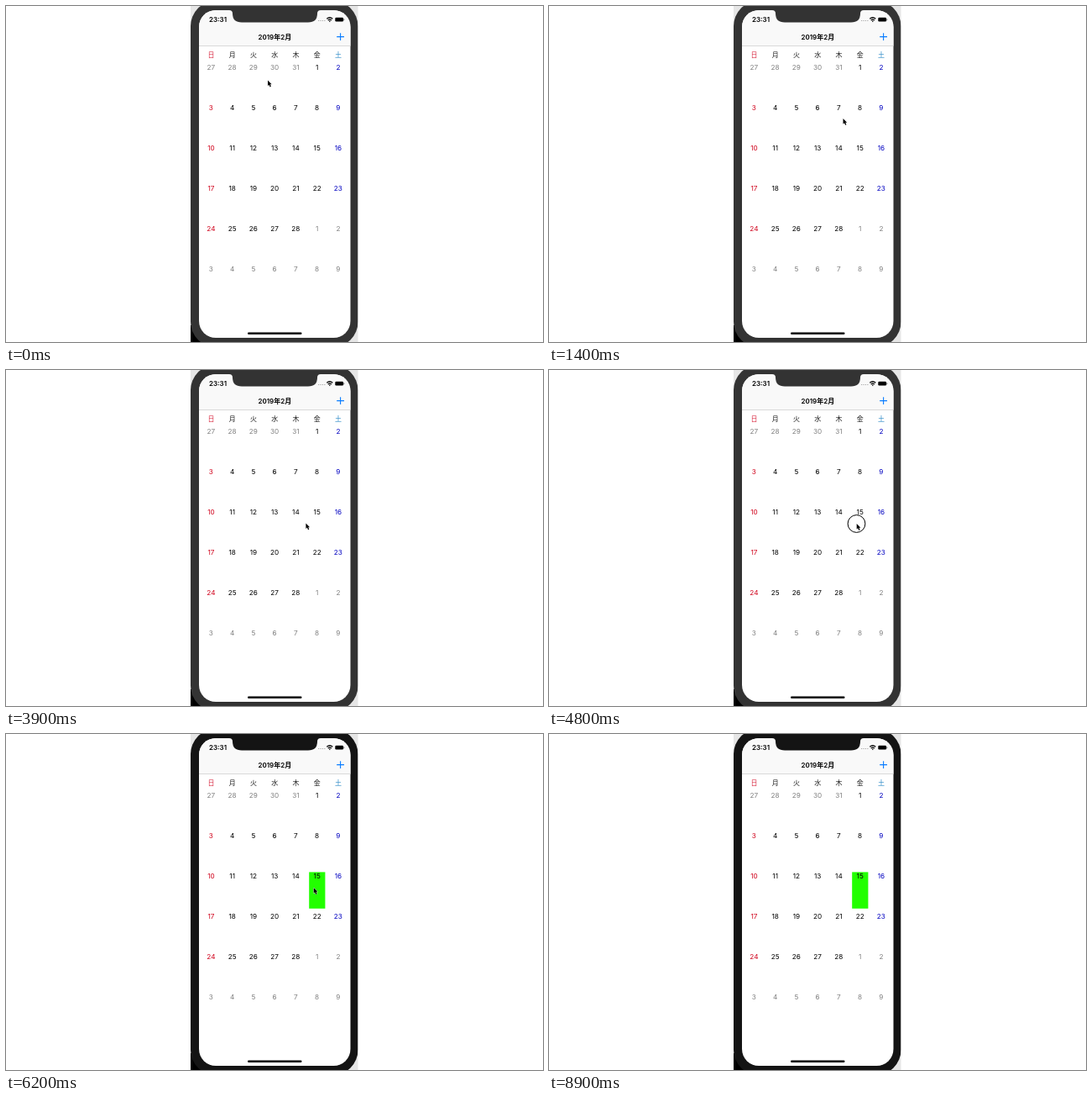
These frames come from a looping animation (640 by 400 pixels, 9000 ms). An HTML page:

```html
<!DOCTYPE html>
<html lang="ja">
<head>
<meta charset="utf-8">
<style>
  html, body { margin: 0; width: 100%; height: 100%; overflow: hidden; background: #fff; }
  svg { display: block; width: 640px; height: 400px; }
  text { font-family: Inter, "Noto Sans CJK JP", "Noto Sans CJK", sans-serif; font-size: 8.2px; text-anchor: middle; }
  .bold { font-weight: 600; font-size: 8px; }
  .weekday { font-size: 8px; }
</style>
</head>
<body>
<svg viewBox="0 0 640 400">
  <defs>
    <clipPath id="stage"><rect x="220" width="199.5" height="400"/></clipPath>
    <clipPath id="screen"><rect x="230" y="5" width="180.5" height="390" rx="20"/></clipPath>
  </defs>
  <g clip-path="url(#stage)">
    <rect x="220" width="200" height="400" fill="#e6e6e6"/>
    <rect x="220" y="380" width="30" height="20"/>
    <rect class="bezel" x="220" y="-6" width="199.5" height="412" rx="30"/>
  </g>
  <g clip-path="url(#screen)">
    <rect x="230" y="5" width="181" height="390" fill="#fff"/>
    <rect x="230" y="5" width="181" height="42.5" fill="#f9f9f9"/>
    <rect x="230" y="47" width="181" height=".6" fill="#c4c4c4"/>
  </g>
  <path class="bezel" d="M266 4V5Q270 5 270 9Q270 19.500 281 19.500H360Q371 19.500 371 9Q371 5 375 5V4Z"/>
  <text class="bold" x="252.500" y="18.900">23:31</text>
  <text class="bold" x="320.300" y="39.700">2019年2月</text>
  <path d="M372 17.500H381" stroke="#aaa" stroke-width="1.200" stroke-dasharray="1.200 1.200"/>
  <g fill="none" stroke="#000" stroke-width="1.300">
    <path d="M382.300 15.300Q385.800 12.200 389.300 15.300M383.700 17Q385.800 15.200 387.900 17"/>
  </g>
  <circle cx="385.800" cy="18.200" r=".8"/>
  <rect x="392.300" y="13.800" width="9.800" height="4.800" rx="1.300"/>
  <rect x="402.500" y="15.400" width=".8" height="1.700" fill="#555"/>
  <path d="M394.200 36.600H403M398.600 32.200V41" stroke="#087cff" stroke-width="1.100"/>
  <rect id="selected" x="361.200" y="164.400" width="19.200" height="43.400" fill="#22ff00"/>
  <g id="calendar"></g>
  <rect x="288" y="388.500" width="64.500" height="2.500" rx="1.250"/>
  <circle id="ring" cx="366.500" cy="183" r="10.400" fill="none" stroke="#000"/>
  <path id="cursor" d="M0 0V6.500L1.500 5.200L2.600 7.900L3.900 7.300L2.800 4.800H4.700Z"
        stroke="#fff" stroke-width=".7" paint-order="stroke"/>
</svg>
<script>
const $ = id => document.getElementById(id);
const LOOP = 9000, STEP = 100, SELECT = 4900, CURSOR_END = 7000;
const columnX = column => 244.4 + column * 25.25;

function addText(text, x, y, fill, className = "") {
  const node = document.createElementNS("http://www.w3.org/2000/svg", "text");
  node.textContent = text;
  node.setAttribute("x", x);
  node.setAttribute("y", y);
  node.setAttribute("fill", fill);
  node.setAttribute("class", className);
  $("calendar").append(node);
}

[..."日月火水木金土"].forEach((name, column) => {
  const fill = column === 0 ? "#d92b42" : column === 6 ? "#2385c4" : "#222";
  addText(name, columnX(column), 61, fill, "weekday");
});

for (let i = 0; i < 42; i++) {
  const date = new Date(2019, 0, 27 + i), column = i % 7;
  const fill = date.getMonth() !== 1 ? "#808080"
    : column === 0 ? "#d0021b" : column === 6 ? "#0000c0" : "#000";
  addText(date.getDate(), columnX(column), 76.4 + 48 * Math.floor(i / 7), fill);
}

// Cursor waypoints: time, x, y
const path = [
  [0, 312, 88.5], [700, 345.6, 89.7], [1000, 352, 108], [1600, 350, 143],
  [2100, 350, 143], [2800, 317.8, 142.7], [3100, 317.8, 142.7],
  [4100, 362, 187], [4700, 366.7, 183], [LOOP, 366.7, 183]
];

function cursorAt(time) {
  const next = path.findIndex(point => point[0] > time);
  const [t0, x0, y0] = path[next - 1], [t1, x1, y1] = path[next];
  const p = (time - t0) / (t1 - t0), eased = p * p * (3 - 2 * p);
  return [x0 + (x1 - x0) * eased, y0 + (y1 - y0) * eased];
}

const show = (id, visible) => $(id).setAttribute("visibility", visible ? "visible" : "hidden");

function draw(now) {
  const time = Math.floor((now % LOOP) / STEP) * STEP;
  const selected = time >= SELECT;
  document.querySelectorAll(".bezel").forEach(part =>
    part.setAttribute("fill", selected ? "#141414" : "#333"));
  show("selected", selected);
  show("ring", time >= SELECT - STEP && !selected);
  show("cursor", time < CURSOR_END);
  $("cursor").setAttribute("transform", `translate(${cursorAt(time)})`);
}

let start;
function frame(now) {
  start ??= now;
  draw(now - start);
  requestAnimationFrame(frame);
}
draw(0);
requestAnimationFrame(frame);
</script>
</body>
</html>
```
